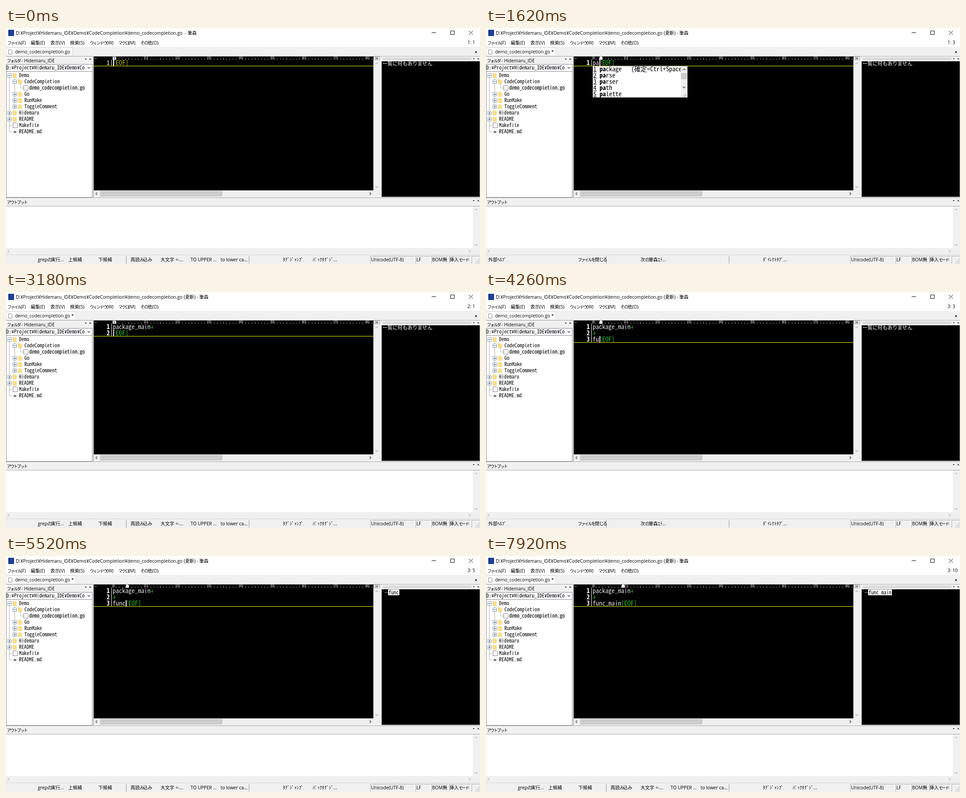
Animation, 1058 px wide and 529 px high, one loop 8 s. Source, as an HTML page:

```html
<!DOCTYPE html>
<html lang="ja">
<head>
<meta charset="utf-8">
<title>Code completion</title>
<style>
  html, body { margin: 0; width: 100%; height: 100%; overflow: hidden; background: #fff; }
  svg { display: block; width: 100%; height: 100%; }
  rect { shape-rendering: crispEdges; }
  .ui { font: 10.2px "Open Sans", "Noto Sans CJK JP", "Noto Sans CJK", sans-serif; }
  .katakana { font-size: 9.4px; letter-spacing: -1.9px; }
  .hiragana { font-size: 9.8px; letter-spacing: -1.8px; }
</style>
</head>
<body>
<svg viewBox="0 0 1058 529"><g id="frame"></g><g id="live"></g></svg>
<script>
const LOOP = 8000, CELL = 7.06, SMALL = 5.64, ROW = 14, LEFT = 238, TOP = 71;
const GREY = '#f0f0f0', THUMB = '#cdcdcd', EDGE = '#a8a8a8', SUNKEN = '#828790';
const GREEN = '#2ec82e', GOLD = '#b8b81c';
const MONO = "'Noto Sans Mono CJK JP', 'Noto Sans CJK JP', 'Liberation Mono', monospace";
const FILE = 'demo_codecompletion.go';

const measure = document.createElement('canvas').getContext('2d');
measure.font = `100px ${MONO}`;
const monoRatio = measure.measureText('0').width / 100;

const escapeText = s => s.replace(/&/g, '&amp;').replace(/</g, '&lt;').replace(/ /g, '\u00a0');
const rect = (x, y, w, h, fill, stroke) => stroke
  ? `<rect x="${x + .5}" y="${y + .5}" width="${w - 1}" height="${h - 1}" fill="${fill}" stroke="${stroke}"/>`
  : `<rect x="${x}" y="${y}" width="${w}" height="${h}" fill="${fill}"/>`;
const path = (d, stroke = '#000', fill = 'none', width = 1) =>
  `<path d="${d}" stroke="${stroke}" fill="${fill}" stroke-width="${width}"/>`;

// Interface text: kana are set tighter than kanji and Latin letters.
const ui = (x, y, s) => `<text class="ui" x="${x}" y="${y}">` + escapeText(s)
  .replace(/[ァ-ヿ]+/g, '<tspan class="katakana">$&</tspan>')
  .replace(/[ぁ-ゖ]+/g, '<tspan class="hiragana">$&</tspan>') + '</text>';

// Fixed-pitch text with half-width characters of the given advance.
const mono = (x, y, s, advance, fill = '#000', weight = 400) =>
  `<text x="${x}" y="${y}" fill="${fill}" font-weight="${weight}" font-size="${2 * advance}"
    font-family="${MONO}" letter-spacing="${advance * (1 - 2 * monoRatio)}">${escapeText(s)}</text>`;

const chevron = (x, y, angle, color = '#404040', size = 3) =>
  `<path d="M${-size} ${size / 2}L0 ${-size / 2}L${size} ${size / 2}" fill="none" stroke="${color}"
    stroke-width="1.2" transform="translate(${x} ${y}) rotate(${angle})"/>`;
const cross = (x, y, r, width = 1) =>
  path(`M${x - r} ${y - r}l${2 * r} ${2 * r}M${x + r} ${y - r}l${-2 * r} ${2 * r}`, '#222', 'none', width);
const paneButtons = (x, y) =>
  path(`M${x - 2} ${y - 1}h4l-2 2.2z`, 'none', '#000') + cross(x + 10, y, 1.8);
const page = (x, y, w, h) =>
  path(`M${x + .5} ${y + .5}h${w - 3}l2 2v${h - 3}h${1 - w}z`, '#808080', '#fff');
const grip = (x, y, color) => [0, 1, 2].map(i => [...Array(i + 1).keys()].map(j =>
  rect(x + 3 * (2 - i) + 3 * j, y + 3 * i, 2, 2, color)).join('')).join('');

function treeView() {
  // [label, level, icon, expander]
  const rows = [
    ['Demo', 0, 'folder', '-'], ['CodeCompletion', 1, 'folder', '-'], [FILE, 2, 'page'],
    ['Go', 1, 'folder', '+'], ['RunMake', 1, 'folder', '+'], ['ToggleComment', 1, 'folder', '+'],
    ['Hidemaru', 0, 'folder', '+'], ['README', 0, 'folder', '+'],
    ['Makefile', 0, 'page'], ['README.md', 0, 'mark'],
  ];
  let out = path('M7.5 106V232.5M19.5 112V176.5M32.5 126V133.5', '#b0b0b0');
  rows.forEach(([label, level, icon, expander], i) => {
    const x = 7 + 12 * level, y = Math.round(105.5 + 14.1 * i), textX = x + 22 - (level > 1 ? 1 : 0);
    const branch = level > 1 ? 32 : x;
    out += path(`M${branch} ${y + .5}h7`, '#b0b0b0');
    if (expander) {
      out += rect(x - 4, y - 4, 9, 9, '#fff', '#8a9aaa') + rect(x - 2, y, 5, 1, '#335080');
      if (expander === '+') out += rect(x, y - 2, 1, 5, '#335080');
    }
    if (icon === 'folder') out += rect(x + 8, y - 5, 4, 10, '#f3cd65') + rect(x + 9, y - 4, 8, 10, '#fbdf8d');
    if (icon === 'page') out += page(x + 8, y - 6, 11, 12);
    if (icon === 'mark') out += rect(x + 10, y - 1, 6, 4, '#777');
    if (level > 1) out += rect(textX - 1, y - 7, 126, 14, GREY);
    out += mono(textX, y + 4, label, SMALL);
  });
  return out;
}

function ruler() {
  let out = '';
  for (let i = 0; i <= 82; i++) {
    const x = LEFT + .5 + i * CELL, h = i % 10 ? i % 5 ? 2 : 3 : 7;
    out += path(`M${x} 71v${-h}`, '#e0e0e0');
    if (i % 10 === 0) out += mono(x + 1, 70, String(i), 3.6, '#eee');
  }
  return out;
}

function drawFrame() {
  const menu = [[3, 'ファイル(F)'], [55, '編集(E)'], [99, '表示(V)'], [143, '検索(S)'],
    [187, 'ウィンドウ(W)'], [251, 'マクロ(M)'], [300, 'その他(O)']];
  return [
    rect(0, 0, 1058, 529, GREY), rect(0, 0, 1058, 42, '#fff'),
    rect(5, 4, 13, 14, '#1c3f94'),
    path('M950 10.5h10M992.5 6.5h8v8h-8z'), cross(1037.5, 10.5, 4.5),
    ...menu.map(([x, s]) => ui(x, 37, s)),
    cross(1049, 54, 2, 1.2), rect(0, 63, 1058, 1, EDGE),

    ui(2, 77, 'フォルダ - Hidemaru_IDE'), paneButtons(178, 70),
    rect(0, 81, 193, 17, '#fff', SUNKEN), mono(1, 92.5, 'D:¥Project¥Hidemaru_IDE¥Demo¥Co', SMALL),
    chevron(185, 89, 180), rect(0, 97, 193, 283, '#fff', SUNKEN), treeView(),

    rect(195, 64, 1, 315, SUNKEN), rect(196, 64, 624, 300, '#000'), ruler(),
    chevron(198, 68, 90, '#777', 1.5), chevron(201, 68, 90, '#777', 1.5),
    rect(820, 64, 15, 8, '#e4e4e4', EDGE), chevron(826, 68, -90, '#333', 1.6), chevron(829, 68, -90, '#333', 1.6),
    chevron(827.5, 79, 0, EDGE), chevron(827.5, 356, 180, EDGE),
    rect(210, 365, 273, 13, THUMB), chevron(202, 371.5, -90), chevron(813, 371.5, 90),

    rect(839, 64, 219, 11, '#f6f6f6'), rect(841, 67, 198, 1, EDGE), rect(841, 70, 198, 1, EDGE),
    paneButtons(1044, 69), rect(838, 74, 220, 305, '#000', SUNKEN),

    rect(0, 380, 1058, 1, EDGE), ui(2, 394, 'アウトプット'), paneButtons(1044, 387),
    rect(0, 399, 1058, 1, EDGE), rect(0, 400, 1042, 93, '#fff'),
    chevron(1049.5, 407, 0, '#b8b8b8'), chevron(1049.5, 486, 180, '#b8b8b8'),
    chevron(6, 500.5, -90, '#b8b8b8'), chevron(1035, 500.5, 90, '#b8b8b8'),

    rect(0, 508, 1058, 1, '#d4d4d4'),
    ...[268, 542].map(x => rect(x, 511, 1, 17, '#999')),
    ...[[813, 99], [914, 33], [949, 38], [989, 48], [1039, 19]].map(([x, w]) =>
      rect(x, 511, w, 1, '#b0b0b0') + rect(x, 511, 1, 17, '#b0b0b0') + rect(x + w, 511, 1, 17, '#fff')),
    ui(815, 523, 'Unicode(UTF-8)'), ui(916, 523, 'LF'), ui(951, 523, 'BOM無'), ui(990, 523, '挿入モード'),
    path('M1047 528l10-10M1051 528l6-6M1055 528l2-2', '#aaa'),
  ].join('');
}

function statusKeys(ctrl) {
  const keys = ctrl
    ? [[5, '外部ﾍﾙﾌﾟ'], [205, 'ファイルを閉じる'], [345, '次の筆森ｴﾃ...'], [618, 'ﾀﾞｲﾚｸﾄﾀｸﾞ...']]
    : [[71, 'grepの実行...'], [139, '上候補'], [206, '下候補'], [278, '再読み込み'], [345, '大文字 <-...'],
       [412, 'TO UPPER ...'], [479, 'to lower ca...'], [618, 'ﾀｸﾞｼﾞｬﾝﾌﾟ'], [685, 'ﾊﾞｯｸﾀｸﾞｼﾞ...']];
  return keys.map(([x, s]) => ui(x, 523, s)).join('');
}

function popupList(words, typed, row, startCol) {
  const x = Math.round(LEFT + startCol * CELL) + (startCol ? 1 : 0), y = TOP + ROW * (row + 1);
  const scrolls = words.length > 4, arrow = scrolls ? '#404040' : EDGE;
  let out = rect(x, y, 212, 71, '#fff', EDGE);
  words.slice(0, 5).forEach((word, i) => {
    const base = y + 11.5 + ROW * i, textX = x + 15.5;
    const hint = i ? '' : '   (確定=Ctrl+Space)';
    out += mono(x + 1.5, base, String(i + 1), CELL) + rect(x + 2, y + 13 + ROW * i, 7, 1, '#000')
      + mono(textX, base, word.slice(0, typed), CELL, '#000', 700)
      + mono(textX + typed * CELL, base, word.slice(typed) + hint, CELL);
  });
  out += rect(x + 197, y + 1, 14, 69, GREY);
  if (scrolls) out += rect(x + 197, y + 16, 14, 14, THUMB);
  return out + chevron(x + 204, y + 8, 0, arrow) + chevron(x + 204, y + 48, 180, arrow)
    + grip(x + 201, y + 61, '#b8b8b8');
}

function editor({ code, edited, caret, popup }) {
  const lines = code.split('\n'), row = lines.length - 1, col = lines[row].length;
  const caretX = LEFT + col * CELL, lineEnd = TOP + ROW * (row + 1);
  let out = '';
  lines.forEach((line, i) => {
    const base = TOP + 11.5 + ROW * i, endX = LEFT + line.length * CELL;
    out += mono(224.5, base, String(i + 1), CELL, '#fff', edited ? 700 : 400)
      + rect(235, TOP + ROW * i, 1, ROW, '#fff') + mono(LEFT, base, line, CELL, '#e4e4e4');
    [...line].forEach((c, k) => {
      if (c === ' ') out += path(`M${LEFT + k * CELL + .5} ${base + 1}h6`, '#aaa');
    });
    out += i < row
      ? path(`M${endX + 3.5} ${base - 9}v8m-2.5 -3l2.5 3l2.5 -3`, GREEN)
      : mono(endX, base, '[EOF]', CELL, edited ? GREEN : GOLD);
  });
  out += path(`M196 ${lineEnd + .2}H820`, '#b0b000', 'none', 1.4);
  out += path(`M${caretX + 1} 71v-5l1.5-2h4l1.5 2v5z`, 'none', '#fff');
  if (!col) out += mono(caretX + 2.5, 70, '0', 3.6);
  if (caret) out += rect(caretX + 1, lineEnd - ROW, 2, ROW, edited ? '#f0c4f0' : '#fff');
  if (popup) {
    const start = lines[row].lastIndexOf(' ') + 1;
    out += popupList(popup, col - start, row, start);
  }
  return out + ui(1030, 36, `${row + 1}: ${col + 1}`);
}

function outlinePane(label) {
  if (!label) return mono(840.5, 84, '一覧に何もありません', 5.56, '#fff');
  return rect(845, 81, 8, 1, '#aaa') + rect(853, 75, Math.round(label.length * SMALL) + 2, 13, '#fff')
    + mono(854, 85.5, label, SMALL);
}

function drawLive(s) {
  const title = `D:¥Project¥Hidemaru_IDE¥Demo¥CodeCompletion¥${FILE} ${s.edited ? '(更新)' : ''} - 筆森`;
  return ui(22, 15, title) + rect(0, 44, s.edited ? 156 : 149, 19, '#fff', '#d9d9d9') + page(5, 48, 9, 11)
    + ui(20, 57, FILE + (s.edited ? ' *' : '')) + editor(s) + outlinePane(s.outline) + statusKeys(s.ctrl);
}

const first = 'package main', body = first + '\n\n';
const initial = { code: '', edited: false, caret: true, ctrl: false, popup: null, outline: '' };
const steps = [
  [0, {}], [120, { caret: false }],
  [450, { code: 'p', caret: true }], [530, { edited: true }], [700, { code: 'pa' }], [850, { ctrl: true }],
  [1000, { popup: ['package', 'parse', 'parser', 'path', 'palette'] }], [1140, { ctrl: false }],
  [1520, { ctrl: true }], [1690, { code: 'package', popup: null }], [1770, { ctrl: false }],
  ...[8, 9, 10, 11, 12].map((n, i) => [2080 + 157.5 * i, { code: first.slice(0, n) }]),
  [3180, { code: first + '\n' }], [3320, { code: body }],
  [3880, { code: body + 'f' }], [4070, { code: body + 'fu' }], [4260, { ctrl: true }],
  [4430, { popup: ['func'] }], [4580, { ctrl: false }],
  [5050, { ctrl: true }], [5170, { popup: null }], [5290, { code: body + 'func' }],
  [5400, { outline: 'func' }], [5520, { ctrl: false }],
  [5820, { code: body + 'func ' }], [5950, { code: body + 'func m' }], [6080, { code: body + 'func ma' }],
  [6200, { ctrl: true }], [6330, { popup: ['main', 'map', 'make', 'math', 'mail'], outline: 'func ma' }],
  [6460, { ctrl: false }], [6590, { code: body + 'func mai', popup: ['main', 'mail'] }],
  [6710, { outline: 'func mai', caret: false }], [6840, { ctrl: true }], [6920, { ctrl: false }],
  [7310, { ctrl: true }], [7430, { popup: null }], [7550, { code: body + 'func main', caret: true }],
  [7680, { outline: 'func main' }], [7800, { ctrl: false }], [7920, { caret: false }],
];

const live = document.getElementById('live');
document.getElementById('frame').innerHTML = drawFrame();
const startTime = performance.now();
let shown = 0;
function tick() {
  const t = (performance.now() - startTime) % LOOP;
  const count = steps.filter(([at]) => at <= t).length;
  if (count !== shown) {
    shown = count;
    live.innerHTML = drawLive(Object.assign({}, initial, ...steps.slice(0, count).map(([, change]) => change)));
  }
  requestAnimationFrame(tick);
}
tick();
</script>
</body>
</html>
```
